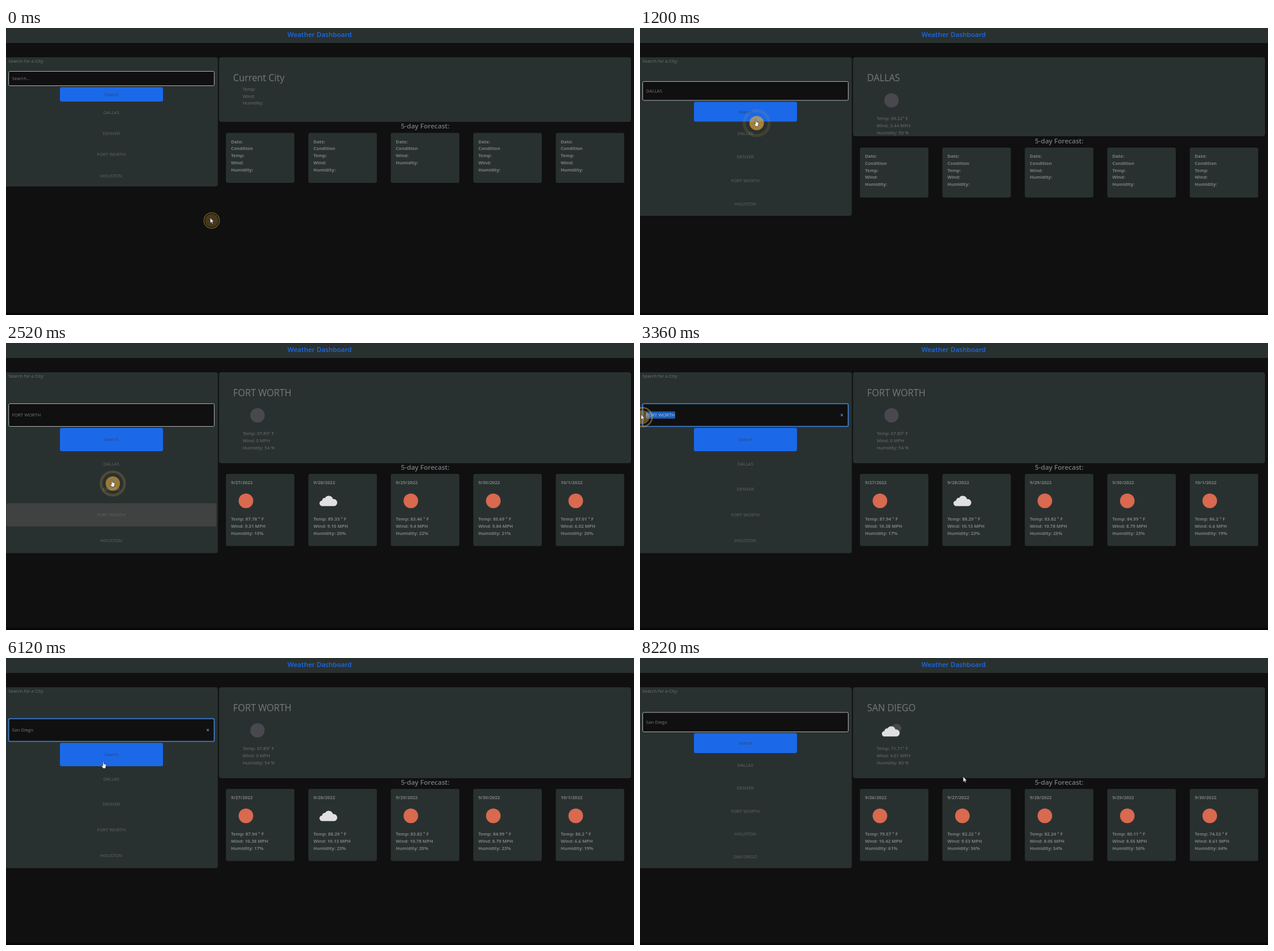
An HTML page for the animation above (8.4 s loop, 1048x480 px).

```html
<!DOCTYPE html>
<html lang="en">
<head>
<meta charset="utf-8">
<title>Weather Dashboard</title>
<style>
  html, body { margin: 0; width: 100%; height: 100%; overflow: hidden; background: #101010; }
  svg { display: block; width: 1048px; height: 480px; }
  text { font: 7.6px "Open Sans", "Noto Sans", sans-serif; fill: #6c7271; white-space: pre; }
  .title { font-size: 11.1px; font-weight: 600; fill: #1b6aea; }
  .head { font-size: 11.2px; font-weight: 600; fill: #777c7b; }
  .city { font-size: 15.4px; font-weight: 500; fill: #757a79; }
  .card { font-size: 7.5px; font-weight: 700; fill: #7a7f7e; }
  .row { font-size: 7.5px; fill: #5f6564; }
  .btn { fill: #24487f; }
  .field { fill: #777a7a; }
  .mid { text-anchor: middle; }
</style>
</head>
<body>
<svg id="stage" viewBox="0 0 1048 480"></svg>
<script>
const LOOP = 8400;
const PANEL = '#293130', SUN = '#d9694f';
const stage = document.getElementById('stage');

// Page layouts: side panel, input, button, list rows, current panel, cards.
const layouts = {
  empty:   { side: 265, input: [72, 97],   btn: [99, 123],  row: 141, step: 35.3, now: 157, cards: [175.5, 259] },
  current: { side: 314, input: [89, 121.5],  btn: [123.5, 156.5], row: 176, step: 39.5, now: 181, cards: [200, 283.5] },
  full:    { side: 351.5, input: [101, 140], btn: [142, 181], row: 202, step: 42.7, now: 201, cards: [219, 339.5] },
  five:    { side: 351.5, input: [90.5, 124], btn: [125.5, 159], row: 179, step: 38.4, now: 201, cards: [219, 339.5] }
};

const cities = {
  DALLAS: { now: ['69.22', '3.44', 50], first: 27,
    temp: [87.78, 89.33, 83.46, 85.69, 87.01], wind: [9.31, 9.15, 9.4, 9.84, 6.02], hum: [15, 20, 22, 21, 20], cloudy: 1 },
  'FORT WORTH': { now: ['67.89', '0', 54], first: 27,
    temp: [87.94, 88.29, 83.82, 84.99, 86.2], wind: [10.38, 10.13, 10.78, 8.79, 6.6], hum: [17, 23, 25, 23, 19], cloudy: 1 },
  'SAN DIEGO': { now: ['71.71', '4.61', 80], first: 26,
    temp: [79.57, 82.22, 82.24, 80.11, 74.53], wind: [10.42, 9.53, 8.05, 8.55, 8.61], hum: [61, 56, 54, 56, 64], cloudy: -1 }
};

// [time, value] steps; the last one reached holds.
const steps = {
  layout: [[0, 'empty'], [960, 'current'], [1680, 'full'], [6360, 'five']],
  city: [[0, ''], [960, 'DALLAS'], [2340, 'FORT WORTH'], [6360, 'SAN DIEGO']],
  forecast: [[0, ''], [1680, 'DALLAS'], [2700, 'FORT WORTH'], [6960, 'SAN DIEGO']],
  hover: [[0, -1], [660, 0], [960, -1], [1560, 2], [2640, -1], [6360, 0], [6660, -1]],
  hand: [[0, 0], [420, 1], [2760, 0], [5880, 1], [6840, 0]]
};
const path = [[0, 342.5, 322], [60, 342.5, 322], [780, 194, 159], [1260, 194, 159], [1680, 177.5, 235],
  [2580, 177.5, 235], [2940, 62, 124], [3120, 62, 124], [3340, 3.5, 124], [5640, 3.5, 124],
  [6080, 163, 179], [6600, 163, 179], [7320, 541, 203], [LOOP, 541, 203]];
const clicks = [-42, 814, 2184, 3190, 6154];
const PRESS = 420, FADE = 120;

const at = (name, t) => steps[name].reduce((v, s) => t >= s[0] ? s[1] : v, null);
const mix = (a, b, u) => a + (b - a) * u;
const ease = u => u * u * (3 - 2 * u);

function cursorAt(t) {
  const i = path.findIndex((p, k) => k && t <= p[0]);
  const a = path[i - 1], b = path[i], u = ease((t - a[0]) / (b[0] - a[0]));
  return [mix(a[1], b[1], u), mix(a[2], b[2], u)];
}

const box = (x, y, x2, y2, fill, r = 0, more = '') =>
  `<rect x="${x}" y="${y}" width="${x2 - x}" height="${y2 - y}" rx="${r}" fill="${fill}" ${more}/>`;
const dot = (x, y, r, fill, more = '') => `<circle cx="${x}" cy="${y}" r="${r}" fill="${fill}" ${more}/>`;
const label = (s, x, y, cls = '') => `<text x="${x}" y="${y + 2.7}" class="${cls}">${s}</text>`;
const lines = (list, x, y, cls) => list.map((s, i) => label(s, x, y + i * 11.8, cls)).join('');
const cloud = (x, y) => `<path transform="translate(${x} ${y})" fill="#e0e0e0"
  d="M-10 9.5a4.6 4.6 0 0 1-.5-9.2A4.2 4.2 0 0 1-5.5-4A7.2 7.2 0 0 1 7.7-2.2A5.8 5.8 0 0 1 10 9.5Z"/>`;

function sidePanel(t, L, city) {
  const [top, bottom] = L.input, mid = (top + bottom) / 2;
  const focused = t >= 3150 && t < 6200;
  const names = ['DALLAS', 'DENVER', 'FORT WORTH', 'HOUSTON'];
  if (city === 'SAN DIEGO') names.push(city);
  const hover = at('hover', t);

  let s = box(-4, 49, 353.5, L.side, PANEL, 4) + label('Search for a City:', 4, 55.7);
  s += box(4.5, top + .5, 347.5, bottom - .5, '#101010', 2,
    focused ? 'stroke="#3f82dc" stroke-width="1.6"' : 'stroke="#a9abaa"');

  const typed = t < 4020 ? 0 : t < 4560 ? 1 + Math.floor((t - 4020) / 180) : 4 + Math.floor((t - 4560) / 72);
  const value = typed ? 'San Diego'.slice(0, typed) : city || 'Search...';
  const caret = t >= 4020 && t < 5400;
  if (t >= 3190 && t < 4020) {
    const from = Math.max(10, cursorAt(t)[0]);
    if (from < 58) s += box(from, mid - 6, 58.5, mid + 6, '#1b5fbd');
  }
  s += `<text id="value" x="10" y="${mid + 2.7}" class="field"${t >= 3300 && t < 4020 ? ' style="fill:#b9c6d8"' : ''}>${value}</text>`;
  if (caret) s += box(0, mid - 5, .8, mid + 5, '#b0b0b0', 0, 'id="caret"');
  if (focused) s += `<path d="M335 ${mid - 1.8}l3.6 3.6m0-3.6l-3.6 3.6" stroke="#4a8ade" stroke-width="1.1"/>`;

  s += box(90, L.btn[0], 262, L.btn[1], '#1b69e8', 3) + label('Search', 176, (L.btn[0] + L.btn[1]) / 2, 'mid btn');
  names.forEach((n, i) => {
    const y = L.row + i * L.step, half = L.step / 2 - 2;
    if (i === hover) s += box(.5, y - half, 351, y + half, city === 'SAN DIEGO' ? '#49494e' : '#404141', 3);
    s += label(n, 175.8, y, 'mid row');
  });
  return s;
}

function currentPanel(L, city) {
  let s = box(355.5, 49, 1043, L.now, PANEL, 4);
  s += `<text x="379" y="88.7" class="city">${city || 'Current City'}</text>`;
  if (!city) return s + lines(['Temp:', 'Wind:', 'Humidity:'], 395, 102);
  const [temp, wind, hum] = cities[city].now;
  s += city === 'SAN DIEGO'
    ? dot(428, 118, 8, '#48494b') + cloud(418.5, 121.8)
    : dot(419.7, 121, 12, '#48484e');
  return s + lines([`Temp: ${temp}° F`, `Wind: ${wind} MPH`, `Humidity: ${hum} %`], 395, 151.3);
}

function forecastCards(L, name) {
  const [top, bottom] = L.cards, data = cities[name];
  let s = label('5-day Forecast:', 699.5, top - 10.2, 'mid head');
  for (let i = 0; i < 5; i++) {
    const x = 367 + i * 137.6;
    s += box(x, top, x + 114.3, bottom, PANEL, 3);
    if (!data) {
      const list = ['Date:', 'Condition', 'Temp:', 'Wind:', 'Humidity:'];
      if (i === 2) list.splice(2, 1);
      s += lines(list, x + 8.4, top + 14.3, 'card');
      continue;
    }
    const day = data.first + i;
    s += label(day > 30 ? `10/${day - 30}/2022` : `9/${day}/2022`, x + 8.4, top + 13.8, 'card');
    s += i === data.cloudy ? cloud(x + 33.4, top + 44.2) : dot(x + 33.4, top + 45, 12.2, SUN);
    s += lines([`Temp: ${data.temp[i]} ° F`, `Wind: ${data.wind[i]} MPH`, `Humidity: ${data.hum[i]}%`],
      x + 8.4, top + 75.3, 'card');
  }
  return s;
}

function pointer(t) {
  const [x, y] = cursorAt(t);
  let s = '';
  const start = clicks.find(c => t >= c && t < c + PRESS + FADE);
  if (start !== undefined) {
    const u = Math.min(1, (t - start) / PRESS);
    const out = 1 - Math.max(0, t - start - PRESS) / FADE;
    s += dot(x + .7, y, mix(11, 12.2, u), '#e0a63c', `opacity="${mix(.22, .72, u) * out}"`);
    s += dot(x + .7, y, mix(12, 21.5, u), 'none',
      `stroke="#d9a842" stroke-width="${mix(.5, 5.4, u)}" opacity="${mix(.72, .08, u) * out}"`);
  }
  const shape = at('hand', t)
    ? 'M-1.4-5.5q1-1 1.6.2v3.2l3 .9q1 .4.9 1.5l-.5 3.2-1 2.2h-3.4l-3-4q-.3-1 .8-.9l1.4 1Z'
    : 'M-1.8-4.8v9.2l2.1-1.9 1.4 3.1 1.5-.7-1.4-3h2.7Z';
  return s + `<path transform="translate(${x} ${y})" d="${shape}" fill="#f4f4f4" stroke="#161616" stroke-width=".6"/>`;
}

let last = '';
function render(t) {
  const L = layouts[at('layout', t)], city = at('city', t);
  const s = box(0, 0, 1048, 480, '#101010') + box(0, 476.5, 1048, 480, '#0a0607') +
    box(0, 0, 1048, 25, PANEL) + label('Weather Dashboard', 523.3, 12, 'mid title') +
    sidePanel(t, L, city) + currentPanel(L, city) + forecastCards(L, at('forecast', t)) + pointer(t);
  if (s === last) return;
  stage.innerHTML = last = s;
  const caret = document.getElementById('caret');
  if (caret) caret.setAttribute('x', 10.4 + document.getElementById('value').getComputedTextLength());
}

const begin = performance.now();
function tick() {
  render((performance.now() - begin) % LOOP);
  requestAnimationFrame(tick);
}
tick();
</script>
</body>
</html>
```
